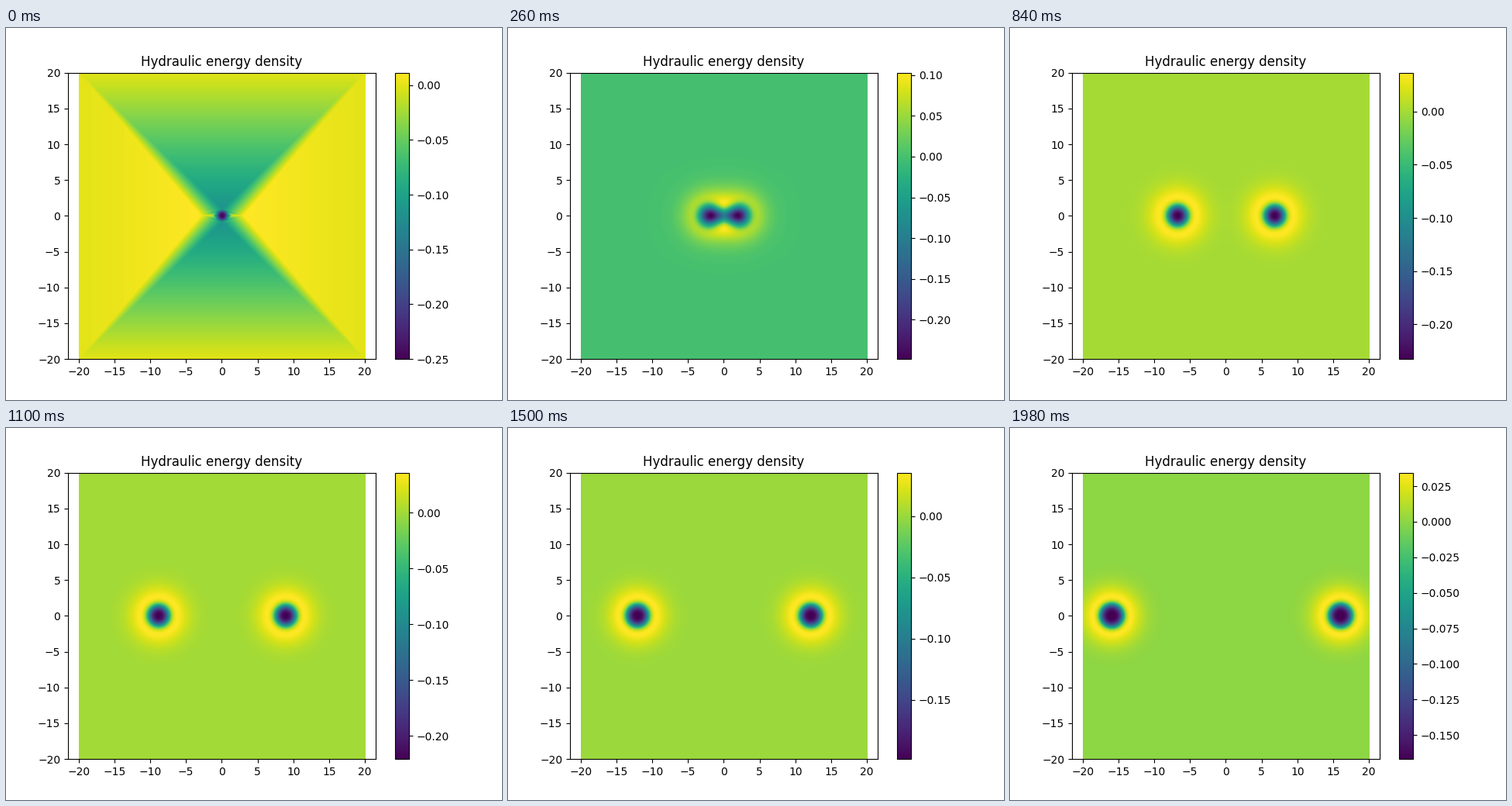
Recreate the animation shown at these times as a matplotlib script. Size 640 px wide and 480 px high, loop 2 s.

```python
import numpy as np
import matplotlib.pyplot as plt
from matplotlib.animation import FuncAnimation
from matplotlib.tri import LinearTriInterpolator, Triangulation

FRAMES, STEP_MS = 100, 20
HALF, GRID = 20, 401

axis = np.linspace(-HALF, HALF, GRID)
X, Y = np.meshgrid(axis, axis)


def coarse_start():
    """Piecewise linear field on a coarse mesh: small core, four far corners."""
    pts = [(0, 0, -0.25)]
    for radius, value in ((0.4, -0.23), (0.9, -0.115)):
        for a in np.arange(8) * np.pi / 4:
            pts.append((radius * np.cos(a), radius * np.sin(a), value))
    for s in (-1, 1):
        pts += [(1.4 * s, 0, -0.004), (3 * s, 0, 0.0113)]
        pts += [(HALF * s, HALF, 0), (HALF * s, -HALF, 0)]
    px, py, pz = np.array(pts).T
    field = LinearTriInterpolator(Triangulation(px, py), pz)(X, Y)
    return np.ma.filled(field, 0)


START = coarse_start()


def limits(k):
    t = k * STEP_MS / 1000
    low = -0.25 + 0.0255 * t**2 - 0.0011 * t**4
    high = np.interp(k, [0, 4, 9, 13, 18, 23, 30, 42, 55, 75, 99],
                     [0.0113, 0.05, 0.095, 0.103, 0.076, 0.052,
                      0.040, 0.0365, 0.036, 0.0355, 0.0345])
    return low, high


def vortex_pair(k, low):
    c = 16 * k / (FRAMES - 1)
    u = k / (FRAMES - 1)
    width = 3.3 - 1.8 * np.exp(-c / 0.8)
    size = 1.4 + 0.4 * u - 0.5 * np.exp(-c)
    power = 2 + 1.5 * u
    r1, r2 = np.hypot(X - c, Y), np.hypot(X + c, Y)
    halo = 0.092 * (np.exp(-(r1 / width)**2) + np.exp(-(r2 / width)**2))
    core = (0.092 - low) * np.exp(-(np.minimum(r1, r2) / size)**power)
    bridge = 0.23 * np.exp(-(c / 2.9)**6) * np.exp(-(X / 1.6)**2 - Y**2)
    return halo - core - bridge


def field(k):
    low, high = limits(k)
    w = np.exp(-k / 2)
    z = w * START + (1 - w) * vortex_pair(k, low)
    return np.where(z < 0, z * low / z.min(), z * high / z.max()), low, high


fig, ax = plt.subplots(figsize=(6.4, 4.8), dpi=100)
z, low, high = field(0)
image = ax.imshow(z, origin="lower", extent=(-HALF, HALF, -HALF, HALF),
                  cmap="viridis", vmin=low, vmax=high,
                  interpolation="bilinear", aspect="auto")
fig.colorbar(image, ax=ax)
box = ax.get_position()
half_x = HALF * box.width * 6.4 / (box.height * 4.8)
ax.set(xlim=(-half_x, half_x), ylim=(-HALF, HALF),
       title="Hydraulic energy density")
ax.set_xticks(range(-HALF, HALF + 1, 5))
ax.set_yticks(range(-HALF, HALF + 1, 5))


def update(k):
    z, low, high = field(k)
    image.set_data(z)
    image.set_clim(low, high)
    return image,


anim = FuncAnimation(fig, update, frames=FRAMES, interval=STEP_MS,
                     repeat=True, repeat_delay=0, blit=False)
plt.show()
```
